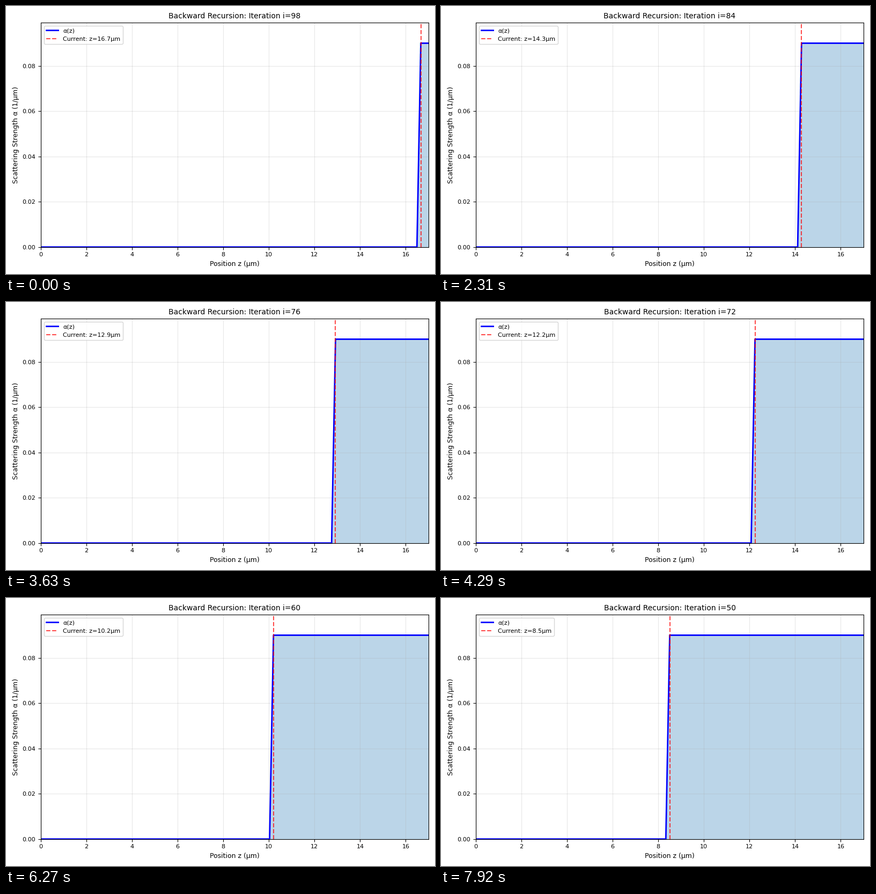
Animation of 800x500 px, one loop 8000 ms. Source, as a matplotlib script:

```python
import numpy as np
import matplotlib.pyplot as plt
from matplotlib.animation import FuncAnimation

LOOP = 8000       # ms
TICK = 20         # ms per drawn frame
HOLD = 330        # ms per iteration shown
FIRST, STRIDE = 98, 2
LENGTH, CELLS = 17.0, 100
ALPHA = 0.09

plt.rcParams.update({
    "font.family": "DejaVu Sans",
    "font.size": 8,
    "axes.titlesize": 10,
    "axes.labelsize": 9,
    "xtick.labelsize": 8,
    "ytick.labelsize": 8,
    "legend.fontsize": 8,
})

z = np.linspace(0, LENGTH, CELLS + 1)

fig, ax = plt.subplots(figsize=(8, 5), dpi=100)
curve, = ax.plot(z, 0 * z, "b-", lw=2, label="α(z)")
fill = ax.fill_between(z, 0, 0 * z, color="#1f77b4", alpha=0.3, lw=0)
marker = ax.axvline(0, color="r", ls="--", lw=1.5, alpha=0.7, label="Current: z=16.7μm")
ax.set_xlim(0, LENGTH)
ax.set_ylim(0, ALPHA * 1.1)
ax.set_xlabel("Position z (μm)")
ax.set_ylabel("Scattering Strength α (1/μm)")
title = ax.set_title(f"Backward Recursion: Iteration i={FIRST}")
ax.grid(True, alpha=0.3)
legend = ax.legend(loc="upper left")
fig.tight_layout()


def update(frame):
    # half a tick of lead centres the rounding of the hold times
    step = (frame * TICK + TICK // 2) // HOLD
    i = FIRST - STRIDE * step
    strength = np.where(np.arange(CELLS + 1) >= i, ALPHA, 0.0)
    curve.set_ydata(strength)
    fill.set_verts([[(z[i - 1], 0), (z[i], ALPHA), (LENGTH, ALPHA), (LENGTH, 0)]])
    marker.set_xdata([z[i], z[i]])
    title.set_text(f"Backward Recursion: Iteration i={i}")
    legend.get_texts()[1].set_text(f"Current: z={z[i]:.1f}μm")
    return curve, fill, marker, title, legend


anim = FuncAnimation(fig, update, frames=LOOP // TICK, interval=TICK,
                     repeat=True, repeat_delay=0, blit=False)
plt.show()
```
